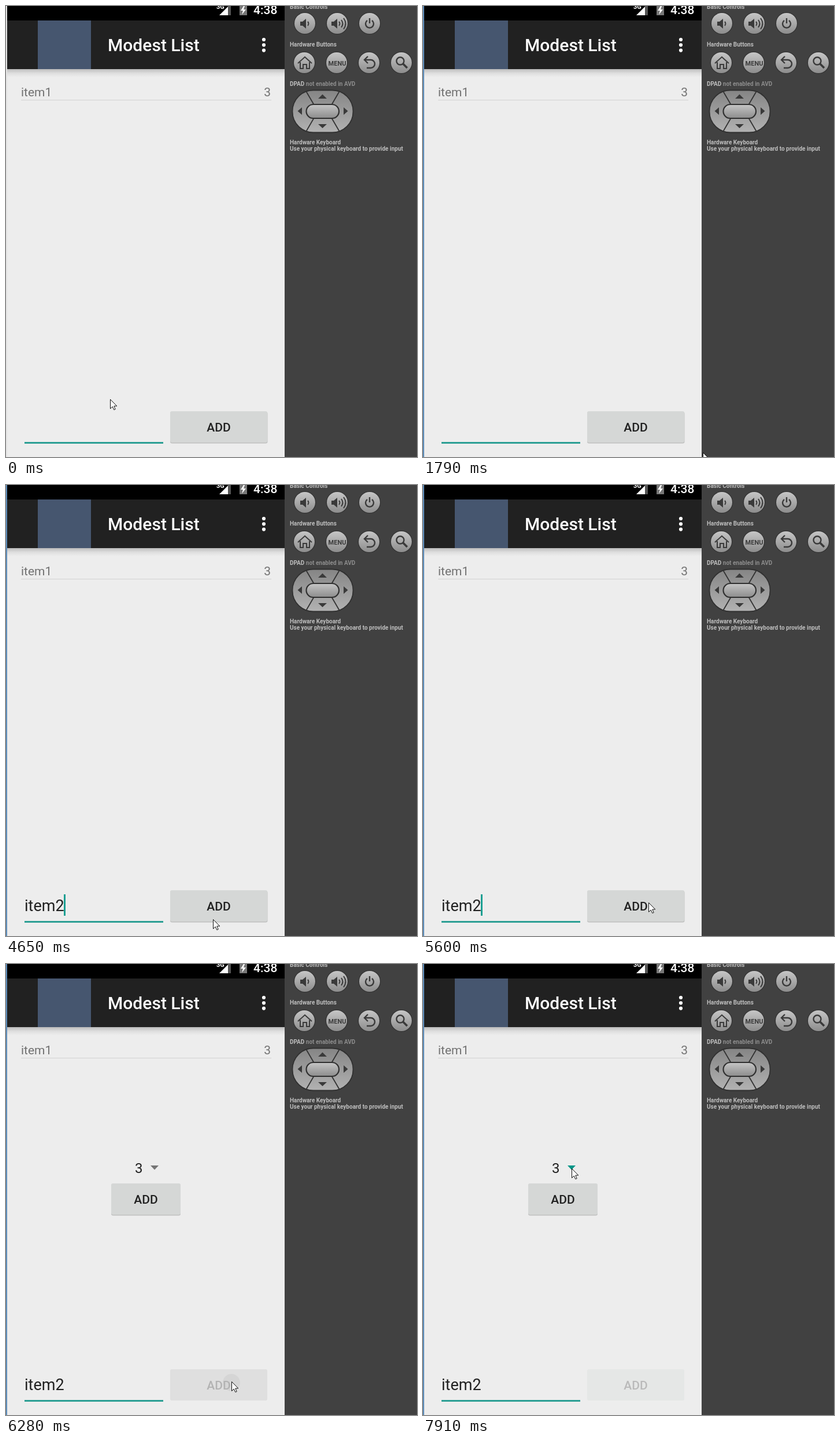
An HTML page that plays this animation: 711 px wide and 779 px high, repeating every 8000 ms.

```html
<!DOCTYPE html>
<html lang="en">
<head>
<meta charset="utf-8">
<title>Todo list in an emulator</title>
<style>
html, body { margin: 0; width: 100%; height: 100%; overflow: hidden; background: #414141; }
svg { display: block; width: 711px; height: 779px; font-family: Roboto, sans-serif; }
.label { font: 700 10px Roboto, sans-serif; fill: #bebebe; }
.btn { font: 500 21px Roboto, sans-serif; text-anchor: middle; fill: #212121; }
.icon { fill: none; stroke: #3a3a3a; stroke-width: 2.4; }
.solid { fill: #3a3a3a; }
</style>
</head>
<body>
<svg viewBox="0 0 711 779">
  <defs>
    <linearGradient id="metal" x2="0" y2="1">
      <stop stop-color="#c6c6c6"/><stop offset="1" stop-color="#8c8c8c"/>
    </linearGradient>
    <linearGradient id="pad" x2="0" y2="1">
      <stop stop-color="#858585"/><stop offset="1" stop-color="#b2b2b2"/>
    </linearGradient>
    <linearGradient id="shade" x2="0" y2="1">
      <stop stop-color="#bcbcbc"/><stop offset=".5" stop-color="#dedede"/><stop offset="1" stop-color="#ededed"/>
    </linearGradient>
    <g id="key">
      <circle r="19.3" fill="#333"/>
      <circle r="18" fill="url(#metal)"/>
    </g>
    <clipPath id="addClip"><rect x="284" y="700" width="168" height="54" rx="3"/></clipPath>
  </defs>

  <!-- phone screen -->
  <rect width="482" height="779" fill="#ededed"/>
  <rect x="2" y="109" width="480" height="14" fill="url(#shade)"/>
  <rect x="2" width="480" height="25"/>
  <rect x="2" y="25" width="480" height="84" fill="#212121"/>
  <rect id="edge" width="2" height="779"/>
  <text x="364" y="5" font-size="11" font-weight="700" fill="#fff">3G</text>
  <path d="M369 16 384 1V16z" fill="#fff"/>
  <path d="M384 0h5V16h-5z" fill="#555"/>
  <path d="M404 0h13V16h-13z" fill="#777"/>
  <path d="M411 0l-5 8h4l-2 7 7-9h-4l2-6z" fill="#fff"/>
  <text x="428" y="14" font-size="21" font-weight="500" fill="#fff">4:38</text>
  <rect x="55" y="25" width="92" height="84" fill="#46566f"/>
  <text x="176" y="78" font-size="30" font-weight="500" fill="#fff">Modest List</text>
  <path d="M446 58v0M446 67.300v0M446 76.600v0" stroke="#fff" stroke-width="6.200" stroke-linecap="round"/>
  <g font-size="21" fill="#727272">
    <text x="26" y="156">item1</text>
    <text x="458" y="156" text-anchor="end">3</text>
  </g>
  <rect x="26" y="162" width="433" height="1" fill="#d2d2d2"/>

  <!-- priority picker -->
  <g id="picker">
    <text x="223" y="361" font-size="24" fill="#212121">3</text>
    <path id="arrow" d="M250 348h14l-7 7.5z"/>
    <rect x="182" y="380" width="120" height="54.5" rx="3" fill="#bfc0bf"/>
    <rect x="182" y="379" width="120" height="54" rx="3" fill="#d5d7d6"/>
    <text class="btn" x="242" y="414">ADD</text>
  </g>

  <!-- input row -->
  <text id="entry" x="32" y="736" font-size="27" fill="#212121"></text>
  <rect x="32" y="753" width="240" height="3" fill="#2c9f94"/>
  <rect id="caret" y="707" width="3" height="37" fill="#1a9f92"/>
  <rect id="addShadow" x="284" y="701" width="168.5" rx="3" fill="#bfc0bf"/>
  <rect id="add" x="284" y="700" width="168" height="54" rx="3"/>
  <circle id="ripple" cx="390" cy="723" clip-path="url(#addClip)" fill-opacity=".045"/>
  <text id="addText" class="btn" x="368" y="735">ADD</text>

  <!-- emulator controls -->
  <rect x="482" width="229" height="779" fill="#414141"/>
  <g class="label">
    <text x="491" y="5">Basic Controls</text>
    <text x="491" y="70">Hardware Buttons</text>
    <text x="491" y="138">DPAD <tspan fill="#8d8d8d">not enabled in AVD</tspan></text>
    <text x="491" y="239">Hardware Keyboard</text>
    <text x="491" y="250">Use your physical keyboard to provide input</text>
  </g>
  <g id="keys"></g>
  <g class="solid">
    <path id="horn" d="M509 27h4l6-5V39l-6-5h-4z"/>
    <use href="#horn" x="54"/>
  </g>
  <g class="icon">
    <path d="M522 27q3 3.500 0 7" stroke-width="2"/>
    <path d="M576 27q3 3.500 0 7M580 24q5 6.500 0 13M584 21q7 9.500 0 19" stroke-width="2"/>
    <path d="M625 25a7 7 0 1 0 8 0M629 21V30"/>
    <path d="M505 99 517 88 529 99M509 97V108H514V101H520V108H525V97" stroke-width="2"/>
    <path d="M626 87 620 93 626 99M621 93H631a6.500 6.500 0 0 1 0 14H624"/>
    <circle cx="682" cy="95" r="6.500"/>
    <path d="M687 100 694 107" stroke-width="3.500"/>
  </g>
  <text x="573" y="103" font-size="11" font-weight="700" text-anchor="middle" fill="#3a3a3a">MENU</text>
  <rect x="495.500" y="145.500" width="105" height="73" rx="36" fill="url(#pad)" stroke="#303030" stroke-width="1.800"/>
  <path d="M519 147 533 171M577 147 563 171M519 217 533 193M577 217 563 193" stroke="#333" stroke-width="1.800"/>
  <rect x="519.500" y="170" width="56.500" height="24" rx="12" fill="url(#metal)" stroke="#303030" stroke-width="2.200"/>
  <path class="solid" d="M540 160 547.500 152.500 555 160zM540 204H555L547.500 211zM512 175V188L504.500 181.500zM584 175V188L591.500 181.500z"/>

  <path id="pointer" d="M.5 .5V16.500L4.200 13 6.800 18.500 9.200 17.500 6.800 12H11.800z" fill="#fff" stroke="#111"/>
</svg>
<script>
const $ = id => document.getElementById(id);
const LOOP = 8000;

const TICK = 136.5, LEAD = 35;
const FOCUS = 5, PRESS = 45, OPEN = 46, SETTLE = 48, TEAL = 58;
const BLINK = 4;
const keyTicks = [22, 23, 24, 28, 34];

// Each pointer move: start, end, x, y
const home = [180, 679];
const moves = [
  [0, 1.5, 120, 733], [9.2, 12.3, 484, 771], [13, 16, 358, 750],
  [35, 38, 390, 721], [49, 53, 244, 347], [53, 55, 257, 353]
];

const set = (id, attrs) => {
  for (const name in attrs) $(id).setAttribute(name, attrs[name]);
};
const show = (id, on) => set(id, { visibility: on ? "visible" : "hidden" });

function ease(n, from, to) {
  const u = Math.min(1, Math.max(0, (n - from) / (to - from)));
  return u * u * (3 - 2 * u);
}

const pointerAt = n => moves.reduce(([x, y], [from, to, x2, y2]) => {
  const k = ease(n, from, to);
  return [x + (x2 - x) * k, y + (y2 - y) * k];
}, home).map(Math.round);

// The caret blinks steadily, and stays lit just after a click or a key.
function caretOn(n) {
  const fresh = [FOCUS, ...keyTicks].some(k => n >= k && n < k + BLINK);
  const lit = (n + 2 * BLINK - 1) % (2 * BLINK) < BLINK;
  return n >= FOCUS && n < PRESS && (fresh || lit);
}

function drawAddButton(n) {
  const pressed = n === PRESS, disabled = n >= OPEN, settled = n >= SETTLE;
  const fill = settled ? "#e5e7e6" : disabled ? "#dfdfdf" : pressed ? "#cbcccb" : "#d5d7d6";
  set("add", { fill });
  set("addShadow", { height: disabled ? 0 : pressed ? 57 : 54.5 });
  set("ripple", { r: pressed ? 60 : disabled && !settled ? 15 : 0 });
  $("addText").style.fill = settled ? "#bababa" : disabled ? "#b3b3b3" : "#212121";
}

function draw(t) {
  const n = Math.floor((t + LEAD) / TICK);
  $("entry").textContent = "item2".slice(0, keyTicks.filter(k => k <= n).length);
  set("caret", { x: Math.floor(32 + $("entry").getComputedTextLength()) });
  show("caret", caretOn(n));
  set("pointer", { transform: `translate(${pointerAt(n)})` });
  set("edge", { fill: n < 3 ? "#e3e3e3" : "#5c8cba" });
  show("picker", n >= OPEN);
  set("arrow", { fill: n < TEAL ? "#757575" : "#009688" });
  drawAddButton(n);
}

// Round keys: three in the first row, four in the second
for (let i = 0; i < 7; i++) {
  const row = i < 3 ? 0 : 1;
  const x = 517 - row + 56 * (i - 3 * row);
  $("keys").innerHTML += `<use href="#key" x="${x}" y="${30 + 68 * row}"/>`;
}

const start = performance.now();
function tick() {
  draw((performance.now() - start) % LOOP);
  requestAnimationFrame(tick);
}
tick();
</script>
</body>
</html>
```
